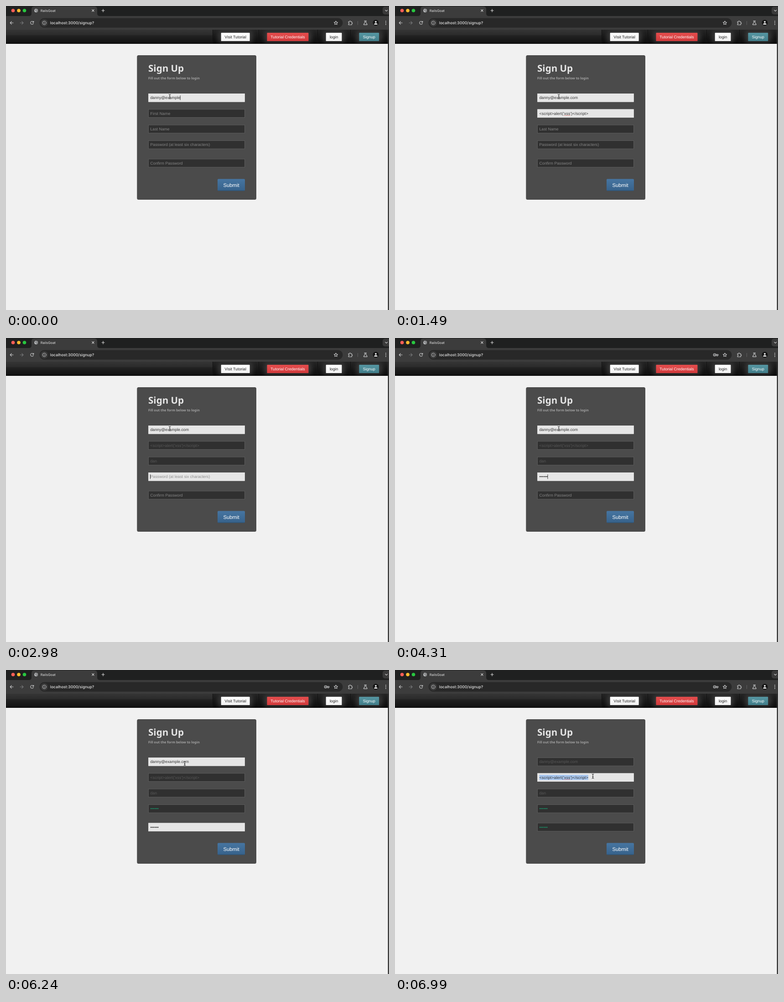
These frames come from a looping animation (840x667 px, 8000 ms). An HTML page:

```html
<!DOCTYPE html>
<html lang="en">
<head>
<meta charset="utf-8">
<title>Sign Up</title>
<style>
  html, body { margin: 0; width: 100%; height: 100%; overflow: hidden; background: #f1f1f1; }
  svg { display: block; width: 840px; height: 667px; }
  text { font: 8.73px "Liberation Sans", Arial, sans-serif; text-rendering: geometricPrecision; white-space: pre; }
  .ui { font-family: Inter, sans-serif; fill: #e6e6e6; }
  .head { font-family: "Noto Sans", sans-serif; font-weight: 700; }
  .mid { text-anchor: middle; }
  .icon { fill: none; stroke: #c9cacb; stroke-width: 1.1; stroke-linecap: round; stroke-linejoin: round; }
  .box { fill: #303030; stroke: #626262; stroke-width: .8; }
  .light .box { fill: #e6e6e6; stroke: #ededed; }
  .field text { fill: #585858; }
  .field.secret text { fill: #1c9068; }
  .field.empty text { fill: #858585; }
  .field.light text { fill: #303030; }
  .field.light.empty text { fill: #8d8d8d; }
</style>
</head>
<body>
<svg viewBox="0 0 840 667" xmlns="http://www.w3.org/2000/svg">
  <defs>
    <linearGradient id="bar" x2="0" y2="1">
      <stop offset="0" stop-color="#353535"/><stop offset=".35" stop-color="#2c2c2c"/>
      <stop offset=".42" stop-color="#222"/><stop offset="1" stop-color="#111"/>
    </linearGradient>
    <linearGradient id="cell" x2="0" y2="1">
      <stop offset="0" stop-color="#252525"/><stop offset="1" stop-color="#0c0c0c"/>
    </linearGradient>
    <linearGradient id="white" x2="0" y2="1">
      <stop offset="0" stop-color="#fff"/><stop offset="1" stop-color="#f1f1f1"/>
    </linearGradient>
    <linearGradient id="red" x2="0" y2="1">
      <stop offset="0" stop-color="#e54d4d"/><stop offset="1" stop-color="#d13a3c"/>
    </linearGradient>
    <linearGradient id="teal" x2="0" y2="1">
      <stop offset="0" stop-color="#5697a3"/><stop offset="1" stop-color="#417d89"/>
    </linearGradient>
    <linearGradient id="blue" x2="0" y2="1">
      <stop offset="0" stop-color="#4675a1"/><stop offset="1" stop-color="#37628b"/>
    </linearGradient>
    <filter id="soft" x="-30%" y="-80%" width="160%" height="260%"><feGaussianBlur stdDeviation="4"/></filter>
    <clipPath id="navClip"><path d="M453 52H838V83H453z"/></clipPath>
  </defs>

  <!-- browser tabs -->
  <rect width="840" height="24" fill="#1f2020"/>
  <circle cx="15.5" cy="10" r="3.8" fill="#ff5f57"/>
  <circle cx="28" cy="10" r="3.8" fill="#febc2e"/>
  <circle cx="40.5" cy="10" r="3.8" fill="#28c840"/>
  <path d="M50 22q6 0 6-6V7q0-6 6-6H194q6 0 6 6v9q0 6 6 6z" fill="#3c3c3c"/>
  <circle cx="66" cy="10" r="4" fill="#b9bbbd"/>
  <path d="M63 8.5l2.2.2 1 1.6-1.4 1.4M67 6.5l-.3 1.6 2.6 1.2M67.2 13l.3-1.8 2-.2" fill="none" stroke="#4a4a4a" stroke-width="1"/>
  <text class="ui" x="75.8" y="12.6" style="font-size:7.4px">RailsGoat</text>
  <g class="icon">
    <path d="M188.8 7.9l4.2 4.2m0-4.2l-4.2 4.2M210 10h6m-3-3v6" stroke="#dedede"/>
  </g>
  <rect x="826" y="1.5" width="20" height="17" rx="5" fill="#3a3a3a"/>
  <path class="icon" d="M831.8 9l2.4 2.4 2.4-2.4" stroke="#ddd"/>

  <!-- address bar -->
  <rect y="22" width="840" height="30" fill="#3c3c3c"/>
  <rect x="73.5" y="26.5" width="665" height="21" rx="10.5" fill="#282828"/>
  <circle cx="84" cy="37" r="8" fill="#3a3a3a"/>
  <g class="icon">
    <path d="M16 37H9.2m3.1-3.2L9.1 37l3.2 3.2"/>
    <path d="M31 37h6.8m-3.1-3.2l3.2 3.2-3.2 3.2" stroke="#797a7b"/>
    <path d="M60.2 38a3.3 3.3 0 1 1-.7-3.4l1 1m.2-2.3v2.4h-2.4"/>
    <circle cx="84" cy="37" r="3.9" stroke-width=".9"/>
    <path d="M84 36.7v2.1M84 35v.1" stroke-width="1"/>
    <path d="M723.5 33l1.2 2.6 2.8.3-2.1 1.9.6 2.8-2.5-1.4-2.5 1.4.6-2.8-2.1-1.9 2.8-.3z"/>
    <path d="M751.2 34.2h2.3c-.3-2 2.6-2 2.3 0h2.5v2.4c2-.3 2 2.6 0 2.3v2.4h-7.1v-2.3c2 .2 2-2.6 0-2.4z"/>
    <path d="M771.5 33.5v7.5" stroke="#606162"/>
    <path d="M786 32.9h4.6m-3.4 0v3l-2.7 4.3q-.4.9.6.9h6.4q1 0 .6-.9l-2.7-4.3v-3"/>
  </g>
  <circle cx="811" cy="36.7" r="6.5" fill="#161616"/>
  <circle cx="811" cy="34.8" r="1.9" fill="#f3f3f3"/>
  <path d="M807.3 40.7q0-3 3.7-3t3.7 3z" fill="#f3f3f3"/>
  <g fill="#d0d1d2"><circle cx="833" cy="33.6" r="1"/><circle cx="833" cy="37" r="1"/><circle cx="833" cy="40.4" r="1"/></g>
  <text class="ui" x="96.8" y="40" style="font-size:8.5px;font-weight:500">localhost:3000/signup?</text>
  <g id="key" class="icon">
    <circle cx="701" cy="37" r="2.7"/><circle cx="701" cy="37" r=".5"/>
    <path d="M703.6 36.1h5.1v1.9h-1v1.2h-2v-1.2h-2.1"/>
  </g>

  <!-- site header -->
  <rect y="52" width="840" height="31" fill="url(#bar)"/>
  <rect x="453" y="52" width="385" height="31" fill="url(#cell)"/>
  <g id="nav" clip-path="url(#navClip)"></g>
  <path d="M0 82.5H838" stroke="#050505"/>
  <rect x="837.6" y="52" width="2.4" height="615" fill="#333"/>

  <!-- form -->
  <rect x="287.3" y="108" width="261.7" height="317" rx="3.5" fill="#4b4b4b"/>
  <text class="head" x="312" y="143.8" style="font-size:20.6px" fill="#e5e5e5">Sign Up</text>
  <text class="head" x="312" y="160.8" style="font-size:7.32px" fill="#a3a3a3">Fill out the form below to login</text>
  <g id="form"></g>
  <rect x="464" y="379.5" width="60" height="26" rx="2" fill="url(#blue)"/>
  <path d="M465 405h58" stroke="#2b5073"/>
  <text class="mid" x="494" y="396.6" style="font-size:11.3px" fill="#fff">Submit</text>

  <g id="popup">
    <rect x="357" y="289" width="97" height="50" rx="5" fill="#000" opacity=".22"/>
    <path d="M361 285h4.5l4-4.2 4 4.2H449.500q4 0 4 4V331q0 4-4 4H361q-4.500 0-4.500-4V289q0-4 4.500-4z" fill="#1f1f1f"/>
    <text class="ui" x="364" y="301.700" style="font-size:8px;font-weight:600">dan</text>
    <text class="ui" x="364" y="324.200" style="font-size:8px;font-weight:600">dan2</text>
  </g>
  <g id="mouse" fill="none" stroke-linecap="round">
    <path id="beam" d="M-2-5Q0-5 0-3.500Q0-5 2-5M0-3.500V3.500M-2 5Q0 5 0 3.500Q0 5 2 5M-1 1H1" stroke="#fff" stroke-opacity=".55" stroke-width="2"/>
    <use href="#beam"/>
    <path d="M-2-5Q0-5 0-3.500Q0-5 2-5M0-3.500V3.500M-2 5Q0 5 0 3.500Q0 5 2 5M-1 1H1" stroke="#111" stroke-width="1"/>
  </g>
</svg>
<script>
const LOOP = 8000, LEFT = 316.5;
const NS = 'http://www.w3.org/2000/svg';
const $ = id => document.getElementById(id);

function add(parent, tag, attrs, text = '') {
  const el = document.createElementNS(NS, tag);
  for (const k in attrs) el.setAttribute(k, attrs[k]);
  el.textContent = text;
  return parent.appendChild(el);
}
const show = (el, on) => { el.style.display = on ? '' : 'none'; };

// Header buttons: label, left, width, fill, text colour, cell edge
const buttons = [
  ['Visit Tutorial', 471.7, 63, 'white', '#222', 453],
  ['Tutorial Credentials', 572.5, 91, 'red', '#fff', 554],
  ['login', 701.7, 34.8, 'white', '#222', 683],
  ['Signup', 774.4, 43.8, 'teal', '#fff', 755],
];
for (const [label, x, width, fill, color, edge] of buttons) {
  const nav = $('nav');
  add(nav, 'rect', { x: x - 7, y: 54, width: width + 14, height: 27, rx: 8, fill: '#3c3c3c', opacity: .75, filter: 'url(#soft)' });
  add(nav, 'path', { d: `M${edge + .5} 52V83`, stroke: '#111' });
  add(nav, 'rect', { x, y: 58.7, width, height: 18.4, rx: 1.2, fill: `url(#${fill})` });
  add(nav, 'text', { x: x + width / 2, y: 71, fill: color, class: 'mid' }, label);
}

const hints = ['Email', 'First Name', 'Last Name', 'Password (at least six characters)', 'Confirm Password'];
const fields = [201.3, 235.7, 270, 304.3, 344.8].map((mid, i) => {
  const g = add($('form'), 'g', {});
  add(g, 'rect', { class: 'box', x: 312.6, y: mid - 8.9, width: 210.8, height: 17.8 });
  const mark = add(g, 'rect', { y: mid - 5.7, height: 11.4, fill: '#a9c7ef' });
  const text = add(g, 'text', { x: LEFT, y: mid + 3.1 });
  const caret = add(g, 'rect', { y: mid - 5, width: .8, height: 10, fill: '#111' });
  if (i === 1) text.style.letterSpacing = '.13px';
  return { g, mark, text, caret };
});
const squiggle = add($('form'), 'path', {
  d: 'M371 240.300H385', stroke: '#e0504a', 'stroke-width': 1.1, 'stroke-dasharray': '1.3 1',
});

const code = "<script>alert('xss')<\/script>";
const dots = n => '\u2022'.repeat(n);

// Each step: start time and what changes. Keys 0-4 hold field text; sel is the selected range.
const steps = [
  [0, { 0: 'danny@example', 1: '', 2: '', 3: '', 4: '', focus: 0, hover: 0, caret: true,
        spell: false, popup: false, key: false, sel: null, mouse: [359.2, 199] }],
  [150, { 0: 'danny@example.c' }],
  [290, { 0: 'danny@example.com' }],
  [440, { focus: 1 }],
  [890, { caret: false }],
  [1040, { 1: code, caret: true, spell: true }],
  [1490, { caret: false }],
  [1790, { focus: 2, caret: true, spell: false }],
  [2240, { 2: 'da', popup: true }],
  [2380, { 2: 'dan' }],
  [2830, { caret: false }],
  [2980, { focus: 3, caret: true, popup: false }],
  [3420, { 3: dots(1), key: true }],
  [3570, { 3: dots(2) }],
  [3720, { 3: dots(3) }],
  [3860, { 3: dots(4) }],
  [4010, { 3: dots(5) }],
  [4310, { 3: dots(6) }],
  [4450, { focus: 4 }],
  [4750, { 4: dots(2) }],
  [4900, { 4: dots(3) }],
  [5190, { 4: dots(4) }],
  [5340, { 4: dots(5) }],
  [5490, { 4: dots(6) }],
  [6090, { caret: false, mouse: [365, 193] }],
  [6240, { mouse: [392, 205] }],
  [6390, { hover: 1, mouse: [427, 229] }],
  [6540, { caret: true, mouse: [434, 233] }],
  [6690, { focus: 1, spell: true }],
  [6840, { caret: false, sel: [code.length - 1, code.length] }],
  [6990, { sel: [0, code.length] }],
];

function draw(s) {
  fields.forEach(({ g, mark, text, caret }, i) => {
    const value = s[i], focused = s.focus === i;
    const marked = focused && s.sel;
    g.setAttribute('class', ['field',
      value ? '' : 'empty',
      i > 2 && value ? 'secret' : '',
      focused || s.hover === i ? 'light' : ''].join(' '));
    text.textContent = value || hints[i];
    const widthTo = n => n ? text.getSubStringLength(0, n) : 0;
    show(mark, marked);
    if (marked) {
      const [from, to] = s.sel.map(widthTo);
      mark.setAttribute('x', LEFT + from);
      mark.setAttribute('width', to - from);
    }
    show(caret, focused && s.caret);
    caret.setAttribute('x', LEFT - .3 + widthTo(value.length));
  });
  show(squiggle, s.spell);
  show($('popup'), s.popup);
  show($('key'), s.key);
  $('mouse').setAttribute('transform', `translate(${s.mouse})`);
}

const start = performance.now();
let shown = -1;
function tick() {
  const t = (performance.now() - start) % LOOP;
  const past = steps.filter(([at]) => at <= t);
  if (past.length !== shown) {
    shown = past.length;
    draw(Object.assign({}, ...past.map(([, change]) => change)));
  }
  requestAnimationFrame(tick);
}
tick();
</script>
</body>
</html>
```
